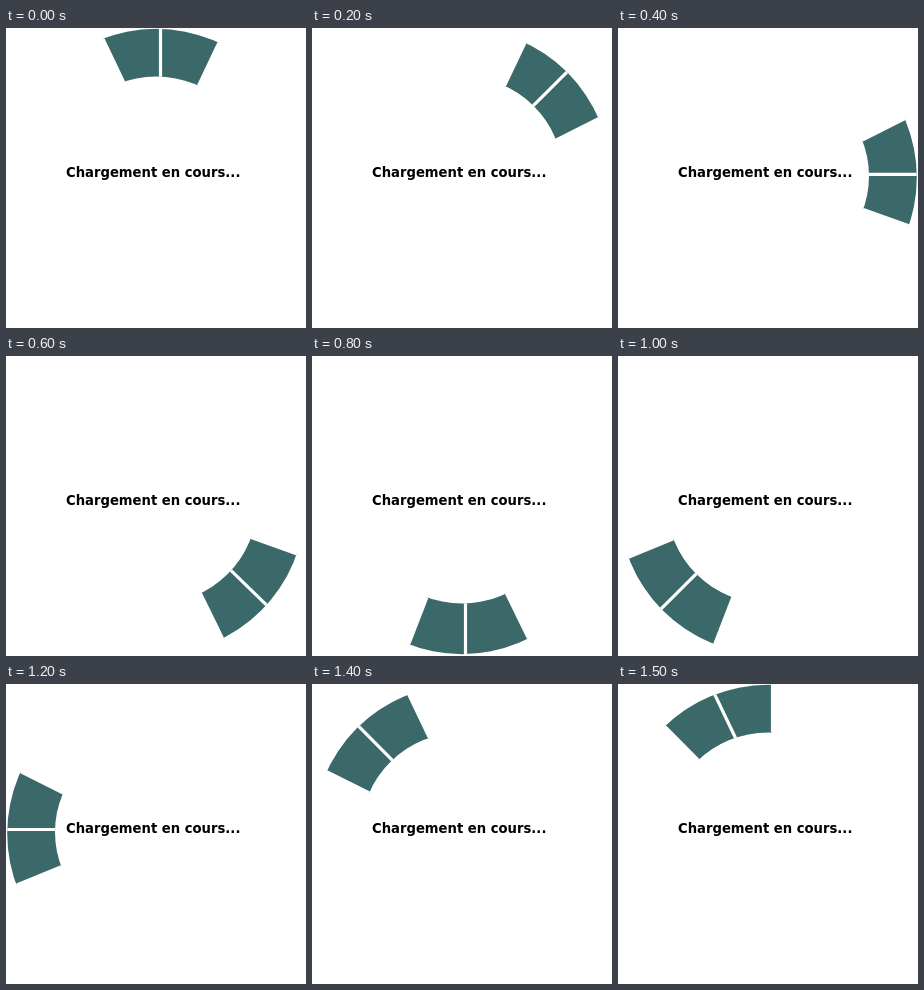
Animation, 300 px wide and 300 px high, one loop 1.6 s. Source, as an HTML page:

```html
<!DOCTYPE html>
<html lang="fr">
<head>
<meta charset="utf-8">
<title>Chargement</title>
<style>
  html, body { margin: 0; width: 100%; height: 100%; overflow: hidden; background: #fff; }
  svg { display: block; width: 300px; height: 300px; }
  text { font: bold 13.2px "DejaVu Sans", sans-serif; }
  .wedge { fill: #3b6868; visibility: hidden; animation: show 1600ms step-end infinite; }
  .gap { stroke: #fff; stroke-width: 3.2; }
  /* each wedge stays lit for two of the sixteen steps */
  @keyframes show {
    0% { visibility: visible; }
    12.5%, 100% { visibility: hidden; }
  }
</style>
</head>
<body>
<svg viewBox="0 0 300 300">
  <clipPath id="ring">
    <path clip-rule="evenodd" d="M1.2 149.5a148.8 148.7 0 0 1 297.6 0a148.8 148.7 0 0 1 -297.6 0z
      M49 148a101 99.5 0 0 1 202 0a101 99.5 0 0 1 -202 0z"/>
  </clipPath>
  <g id="wheel" clip-path="url(#ring)"></g>
  <text x="60" y="149">Chargement en cours...</text>
</svg>
<script>
  // Dividing lines clockwise from the top: inner x, y, outer x, y
  const spokes = [
    [154.5, 49, 154.5, 1], [192.5, 57.7, 213, 14.7],
    [223, 76, 257, 42], [245.3, 111.5, 286.5, 90.7],
    [251, 146.4, 299, 146.4], [246, 181.8, 290.5, 197.7],
    [225.5, 215, 260, 248.5], [194.5, 237.5, 216.3, 282],
    [153.5, 247, 153.5, 298], [115, 241, 96.8, 288],
    [78, 218, 44, 252], [55, 183, 11, 201],
    [49, 145.5, 1, 145.5], [56.7, 108.7, 14.7, 87.7],
    [80, 76, 47, 42.7], [117.3, 53.5, 97, 11]
  ];
  const count = spokes.length, step = 100;
  const wheel = document.getElementById('wheel');

  // Lengthen a line at both ends so the ring clip cuts it
  const extend = ([x, y, u, v]) => {
    const dx = (u - x) * 0.3, dy = (v - y) * 0.3;
    return [x - dx, y - dy, u + dx, v + dy];
  };

  const add = (cls, d) => {
    const path = document.createElementNS('http://www.w3.org/2000/svg', 'path');
    path.setAttribute('class', cls);
    path.setAttribute('d', d);
    return wheel.appendChild(path);
  };

  const lines = spokes.map(extend);
  lines.forEach(([x, y, u, v], i) => {
    const [p, q, r, s] = lines[(i + 1) % count];
    const wedge = add('wedge', `M${x} ${y}L${u} ${v}L${r} ${s}L${p} ${q}z`);
    wedge.style.animationDelay = (i ? i - count : 0) * step + 'ms';
  });
  lines.forEach(([x, y, u, v]) => add('gap', `M${x} ${y}L${u} ${v}`));
</script>
</body>
</html>
```
